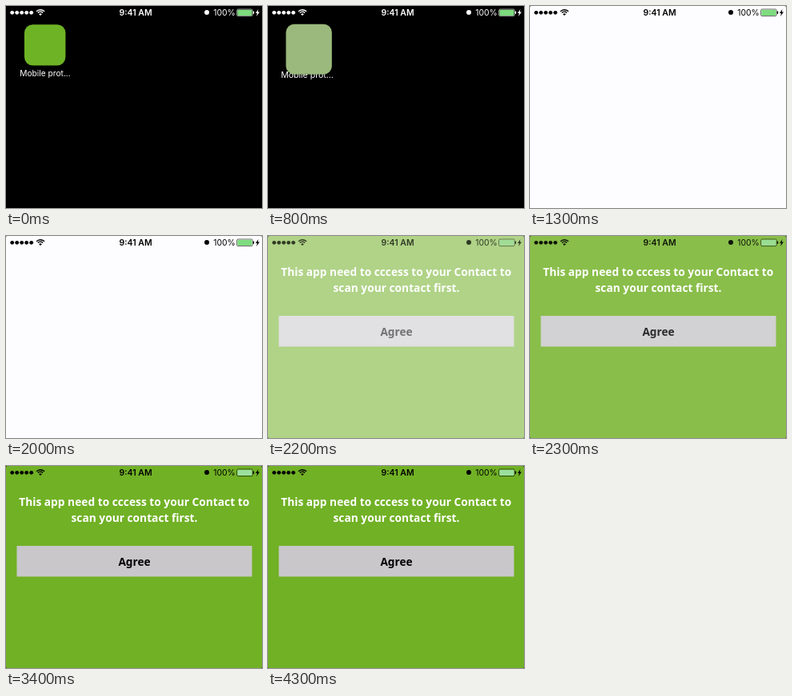
An HTML page with a canvas for the animation above (4400 ms loop, 320 by 253 pixels).

```html
<!DOCTYPE html>
<html lang="en">
<head>
<meta charset="utf-8">
<style>
html, body { margin: 0; width: 100%; height: 100%; overflow: hidden; background: #000; }
canvas { display: block; width: 100vw; height: 100vh; }
</style>
</head>
<body>
<canvas></canvas>
<script>
const W = 320, H = 253, SCREEN_H = 568, LOOP = 4400, STEP = 100;
const GREEN = '#71b125', WHITE = '#fdfcfe', ICON = '#6eb326', PRESSED = '#55881f';
const canvas = document.querySelector('canvas');
const ctx = canvas.getContext('2d');

const mix = (a, b, p) => a + (b - a) * p;

// Piecewise linear value over [time, value] points.
function at(t, keys) {
  if (t <= keys[0][0]) return keys[0][1];
  for (let i = 1; i < keys.length; i++) {
    const [t0, a] = keys[i - 1], [t1, b] = keys[i];
    if (t <= t1) return mix(a, b, (t - t0) / (t1 - t0));
  }
  return keys[keys.length - 1][1];
}

function layer(alpha, draw) {
  ctx.save();
  ctx.globalAlpha = alpha;
  draw();
  ctx.restore();
}

function box(x, y, w, h, r, fill) {
  ctx.fillStyle = fill;
  ctx.beginPath();
  ctx.roundRect(x, y, w, h, r);
  ctx.fill();
}

function dot(x, y, r) {
  ctx.beginPath();
  ctx.arc(x, y, r, 0, 7);
  ctx.fill();
}

function text(str, x, y, font, color, align = 'center') {
  ctx.font = font + ', sans-serif';
  ctx.textAlign = align;
  ctx.fillStyle = color;
  ctx.fillText(str, x, y);
}

function statusBar(color, charge = '#7edb7f') {
  ctx.fillStyle = ctx.strokeStyle = color;
  for (let i = 0; i < 5; i++) dot(7.7 + i * 6, 8.3, 2.4);

  // Wi-Fi
  ctx.lineWidth = 1.4;
  for (const r of [6.9, 4.4]) {
    ctx.beginPath();
    ctx.arc(43, 11.6, r, -Math.PI * .76, -Math.PI * .24);
    ctx.stroke();
  }
  ctx.beginPath();
  ctx.moveTo(43, 12);
  ctx.arc(43, 12, 2.6, -Math.PI * .76, -Math.PI * .24);
  ctx.fill();

  dot(251, 8, 3);
  text('9:41 AM', 162, 12, '600 10.5px Inter', color);
  text('100%', 286.8, 12, '400 10.4px Inter', color, 'right');

  // Battery and bolt
  ctx.lineWidth = .6;
  ctx.beginPath();
  ctx.roundRect(288.6, 4, 19.6, 8.6, 1.6);
  ctx.stroke();
  box(289.3, 4.7, 18.2, 7.2, .8, charge);
  box(308.7, 6.6, 1.4, 3.4, .7, color);
  ctx.beginPath();
  for (const [x, y] of [[315.4, 4], [312, 9], [314, 9], [313, 13], [317, 7.4], [314.8, 7.4]]) ctx.lineTo(x, y);
  ctx.fill();
}

function home(t) {
  layer(at(t, [[800, 1], [900, .6], [1000, .12], [1100, 0]]), () => {
    statusBar('#fff');
    const s = at(t, [[700, 1], [800, 1.035], [1000, 3]]);
    ctx.translate(49, 49);
    ctx.scale(s, s);
    text('Mobile prot...', 0, 39.2, '400 10.2px Inter', '#fff');
  });
}

// The icon grows into the app's blank first screen.
function launch(t) {
  const p = at(t, [[700, 0], [800, .022], [900, .42], [1000, .9], [1100, .985], [1200, 1]]);
  const x = mix(23, 0, p), y = mix(23.2, 0, p);
  const w = mix(51.4, W, p), h = mix(51.4, SCREEN_H, p);
  const r = mix(10.5, 1.5, p);
  const white = at(t, [[700, 0], [800, .42], [900, .85], [1000, 1]]);
  box(x, y, w, h, r, t < 700 ? ICON : PRESSED);
  layer(white, () => box(x, y, w, h, r, WHITE));
  layer(at(t, [[800, 0], [900, .6], [1000, 1]]), () => {
    ctx.translate(x, y);
    ctx.scale(w / W, w / W);
    statusBar('#000');
  });
}

// The consent page appears from under a fading white veil.
function consent(t) {
  const p = at(t, [[2100, 0], [2200, .55], [2300, .83], [2400, .98], [2500, 1]]);
  const head = '600 13.75px "Noto Sans"';
  box(0, 0, W, H, 1.5, GREEN);
  box(13.5, 100, 294, 38.5, 0, '#c9c7ca');
  text('This app need to cccess to your Contact to', 160.2, 50, head, '#fff');
  text('scan your contact first.', 160.5, 70, head, '#fff');
  text('Agree', 160.5, 124.5, '600 13.7px "Noto Sans"', '#000');
  layer(1 - p, () => box(0, 0, W, H, 1.5, WHITE));
  layer(mix(.4, 1, p), () => statusBar('#000', '#9be09c'));
}

function frame(now) {
  const t = Math.floor(now % LOOP / STEP) * STEP;
  const ratio = devicePixelRatio || 1;
  if (canvas.width !== Math.floor(W * ratio)) {
    canvas.width = W * ratio;
    canvas.height = H * ratio;
  }
  ctx.setTransform(ratio, 0, 0, ratio, 0, 0);
  ctx.fillStyle = '#000';
  ctx.fillRect(0, 0, W, H);
  if (t < 2200) {
    home(t);
    launch(t);
  } else consent(t);
  requestAnimationFrame(frame);
}

requestAnimationFrame(frame);
</script>
</body>
</html>
```
